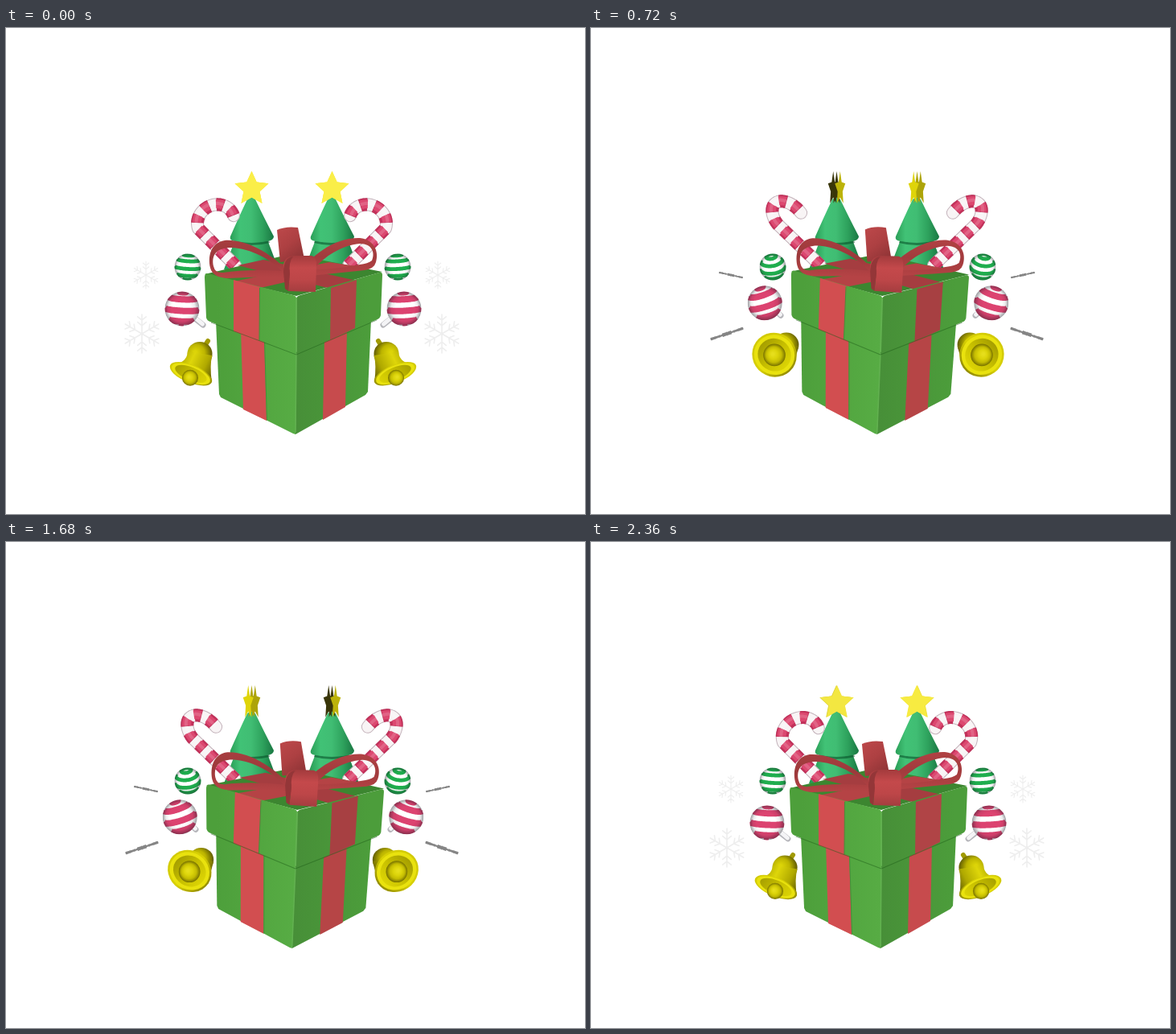
An HTML page with a canvas that plays this animation: 720 by 604 pixels, repeating every 2400 ms.

```html
<!DOCTYPE html>
<html lang="en">
<head>
<meta charset="utf-8">
<title>Gift box</title>
<style>
html, body { margin: 0; width: 100%; height: 100%; overflow: hidden; background: #fff; }
canvas { display: block; width: 720px; height: 604px; }
</style>
</head>
<body>
<canvas id="stage" width="720" height="604"></canvas>
<script>
const ctx = document.getElementById('stage').getContext('2d');
const LOOP = 2400, STEP = 40, TAU = Math.PI * 2, RAD = Math.PI / 180;
const { sin, cos, abs, hypot } = Math;
const mix = (a, b, k) => a + (b - a) * k;
const bump = (s, at, width) => Math.exp(-(((s - at) / width) ** 2));
const rgb = (...c) => `rgb(${c.map(Math.round)})`;

function poly(fill, ...pts) {
  ctx.beginPath();
  for (let i = 0; i < pts.length; i += 2) ctx.lineTo(pts[i], pts[i + 1]);
  ctx.closePath();
  ctx.fillStyle = fill;
  ctx.fill();
}

function shape(d, fill) {
  ctx.fillStyle = fill;
  ctx.fill(new Path2D(d), 'evenodd');
}

function ellipse(x, y, rx, ry, rot, fill) {
  ctx.beginPath();
  ctx.ellipse(x, y, rx, ry, rot, 0, TAU);
  ctx.fillStyle = fill;
  ctx.fill();
}

function stops(gradient, colors) {
  colors.forEach((c, i) => gradient.addColorStop(i / (colors.length - 1), c));
  return gradient;
}

const linear = (x0, y0, x1, y1, ...colors) => stops(ctx.createLinearGradient(x0, y0, x1, y1), colors);
const radial = (x, y, r, ...colors) =>
  stops(ctx.createRadialGradient(x - r * .15, y - r * .1, r * .1, x, y, r), colors);

function line(color, width, ...pts) {
  ctx.beginPath();
  for (let i = 0; i < pts.length; i += 2) ctx.lineTo(pts[i], pts[i + 1]);
  ctx.strokeStyle = color;
  ctx.lineWidth = width;
  ctx.stroke();
}

// Draws on the left, then mirrored on the right
function both(draw, shift = 0) {
  draw(false);
  ctx.save();
  ctx.translate(711 + shift, 0);
  ctx.scale(-1, 1);
  draw(true);
  ctx.restore();
}

// Sphere with latitude bands around a pole
function stripedBall(x, y, r, color, pole, gap, width) {
  const len = hypot(...pole), [px, py, pz] = pole.map(v => v / len);
  const h = hypot(px, py), ux = -py / h, uy = px / h;
  const wx = -pz * uy, wy = pz * ux, wz = px * uy - py * ux;
  ctx.save();
  ctx.beginPath();
  ctx.arc(x, y, r, 0, TAU);
  ctx.fillStyle = '#fff';
  ctx.fill();
  ctx.clip();
  ctx.strokeStyle = color;
  ctx.lineWidth = width;
  ctx.lineCap = 'butt';
  for (let lat = -2 * gap; lat <= 2 * gap; lat += gap) {
    const a = sin(lat * RAD), b = cos(lat * RAD);
    let pen = false;
    ctx.beginPath();
    for (let i = 0; i <= 120; i++) {
      const c = b * cos(i * TAU / 80), d = b * sin(i * TAU / 80);
      if (a * pz + d * wz < -.04) { pen = false; continue; }
      const qx = x + r * (a * px + c * ux + d * wx), qy = y + r * (a * py + c * uy + d * wy);
      pen ? ctx.lineTo(qx, qy) : ctx.moveTo(qx, qy);
      pen = true;
    }
    ctx.stroke();
  }
  ctx.fillStyle = radial(x, y, r, 'rgba(0,0,0,0)', 'rgba(0,0,0,0)', 'rgba(0,0,0,0)', 'rgba(20,20,30,.08)', 'rgba(20,20,30,.42)');
  ctx.fillRect(x - r, y - r, 2 * r, 2 * r);
  ctx.restore();
}

// Snowflake that turns sideways, then tips over
function flake(x, y, r, s, tilt, dark) {
  const yaw = bump(s, .32, .13), pitch = bump(s, .6, .11);
  const tone = 238 - (238 - dark) * yaw ** 4 - 105 * pitch;
  ctx.save();
  ctx.translate(x, y);
  ctx.rotate((17 * yaw + tilt * pitch) * RAD);
  ctx.scale(1 - .76 * yaw, 1 - .93 * pitch);
  ctx.beginPath();
  for (let i = 0; i < 6; i++) {
    ctx.moveTo(0, 0);
    ctx.lineTo(0, -r);
    for (const at of [.42, .7])
      for (const side of [-1, 1]) {
        ctx.moveTo(0, -r * at);
        ctx.lineTo(side * r * .22, -r * (at + .18));
      }
    ctx.rotate(TAU / 6);
  }
  ctx.restore();
  ctx.lineCap = 'round';
  ctx.lineWidth = r / 15;
  ctx.strokeStyle = rgb(tone, tone, tone);
  ctx.stroke();
}

function tree(x) {
  const bark = linear(x - 28, 0, x + 28, 0, '#289a54', '#41c276', '#40bd73', '#2ea25d', '#1a7843');
  shape(`M${x - 20} 263 L${x - 34} 300 H${x + 34} L${x + 20} 263Z`, bark);
  shape(`M${x - 21} 264 Q${x} 270 ${x + 22} 264 L${x + 23} 267 Q${x} 273 ${x - 22} 267Z`, 'rgba(5,75,38,.55)');
  shape(`M${x - 5} 213 Q${x} 208 ${x + 5} 213 Q${x + 15} 234 ${x + 28} 259
    Q${x + 28} 264 ${x + 20} 265 Q${x} 268 ${x - 20} 265 Q${x - 28} 264 ${x - 26} 259 Q${x - 15} 234 ${x - 5} 213Z`, bark);
}

function star(x, turn, right) {
  const edge = abs(sin(turn)), lit = (sin(2 * turn) >= 0) !== right;
  const face = mix(250, lit ? 222 : 185, edge), side = mix(face, lit ? 170 : 50, edge);
  for (let layer = 1; layer >= -1; layer--) {
    const tone = layer < 0 ? face : side;
    ctx.beginPath();
    for (let i = 0; i < 10; i++) {
      const r = i % 2 ? 10.5 : 22, a = i * TAU / 10;
      ctx.lineTo(x + layer * (lit ? 4.5 : -4.5) * edge + r * sin(a) * cos(turn), 200 - r * cos(a));
    }
    ctx.closePath();
    ctx.fillStyle = rgb(tone, tone * .95, mix(72, 6, edge));
    ctx.fill();
  }
}

// Straight stem and a half-circle hook that turns about the stem
function cane(s) {
  const r = 22, x = 235 + 4 * cos(TAU * s), y = 246 + 3 * cos(TAU * s);
  const nx = r * cos(1.4 * s), ny = r * (.4 * s ** 4 - .36 - .25 * sin(5.2 * s));
  const ux = -r * (.3 + .45 * sin(1.75 * s)), uy = -r * .92;
  const path = new Path2D();
  path.moveTo(285, 295);
  for (let i = 0; i <= 24; i++) {
    const a = i / 24 * Math.PI;
    path.lineTo(x + nx * (1 - cos(a)) + ux * sin(a), y + ny * (1 - cos(a)) + uy * sin(a));
  }
  const pass = (color, width, cap, dash, shift = 0) => {
    ctx.save();
    ctx.translate(shift, shift);
    ctx.lineJoin = 'round';
    ctx.strokeStyle = color;
    ctx.lineWidth = width;
    ctx.lineCap = cap;
    ctx.setLineDash(dash);
    ctx.stroke(path);
    ctx.restore();
  };
  pass('#c3b2ba', 16, 'round', []);
  pass('#f8f4f5', 14, 'round', []);
  pass('#c2315a', 16, 'butt', [9, 9]);
  pass('#dc4870', 11, 'butt', [9, 9], -.7);
  pass('rgba(255,255,255,.15)', 4, 'round', [], -1.5);
}

function lolly(k) {
  const x = mix(219, 216, k), y = mix(349, 341, k);
  const sx = mix(245, 235, k), sy = mix(368, 355, k);
  ctx.lineCap = 'round';
  line('#b5b5ba', 7, x + 16, y + 12, sx, sy + 1);
  line('#f4f4f6', 5, x + 16, y + 11, sx - .5, sy);
  stripedBall(x, y, 21.5, '#dc4370', [mix(.05, -.36, k), -1, mix(.12, .25, k)], 40, 8);
}

function bell(k) {
  const mx = mix(230, 228, k), my = mix(430, 405, k), tilt = mix(22, 36, k) * RAD;
  const major = 28, minor = mix(11, 28, k), dx = mix(241, 243, k), dy = mix(405, 393, k);
  const cx = cos(tilt) * major, cy = sin(tilt) * major;
  ctx.lineCap = 'round';
  line('#a19a00', 6, mix(251, 252, k), 389, dx, dy);
  ellipse(dx, dy, 15.5, 15, 0, radial(dx - 3, dy, 19, '#dcd408', '#bdb500', '#5b5600'));
  ctx.beginPath();
  ctx.moveTo(dx - 15, dy - 3);
  ctx.quadraticCurveTo(dx - 16, mix(dy + 12, my, k), mx - cx, my - cy);
  ctx.lineTo(mx + cx, my + cy);
  ctx.quadraticCurveTo(dx + 12, dy + 14, dx + 15.5, dy + 2);
  ctx.fillStyle = linear(mx - 22, my - 12, mx + 28, my + 12, '#a39c00', '#ded60a', '#b0a900', '#4b4600');
  ctx.fill();
  ellipse(mx, my, major, minor, tilt, linear(mx - 20, my - 20, mx + 22, my + 22, '#d2ca06', '#d8d004', '#8c8500'));
  ellipse(mx, my, major - 2.5, minor * .9, tilt, '#e9e20e');
  ellipse(mx, my, major - 7, minor * .74, tilt, linear(mx - 16, my - 14, mx + 18, my + 16, '#a59e00', '#c8c000', '#dfd706'));
  const bx = mix(229, 228, k), by = mix(435, 405, k), r = mix(10, 14, k);
  ellipse(bx, by, r, r, 0, radial(bx, by, r, '#e6de1c', '#dcd40a', '#c4bc02', '#777100'));
}

function box(angle) {
  const dim = angle / 5;
  const leaf = linear(262, 0, 361, 0, '#4d9f3b', '#57ac44');
  const shade = linear(361, 0, 452, 0, '#478f38', '#4c9d3b');
  const red = '#d24e50';
  const sideRed = rgb(mix(199, 152, dim), mix(75, 58, dim), mix(77, 59, dim));
  const lidRed = rgb(mix(176, 150, dim), mix(68, 58, dim), mix(70, 59, dim));
  ctx.save();
  ctx.translate(358, 370);
  ctx.rotate(angle * RAD);
  ctx.translate(-358, -370);
  ctx.lineJoin = ctx.lineCap = 'round';

  // Body
  poly(leaf, 261, 364, 361, 396, 360, 505, 357, 504, 267, 459, 265, 455);
  poly(shade, 361, 396, 454, 362, 450, 452, 447, 456, 360, 505);
  poly(red, 292, 374, 321, 384, 324, 488, 295, 474);
  poly(sideRed, 396, 384, 424, 374, 422, 471, 394, 487);
  line('#44903a', 1, 321.5, 388, 324.5, 487);
  line('#62b150', 1.5, 361, 405, 360, 502);

  // Lid
  poly('#3c8630', 247, 306, 354, 281, 468, 303, 361, 333);
  poly('#b54345', 283, 315, 316, 323, 435, 296, 402, 291);
  poly('#a53d40', 404, 324, 436, 314, 320, 288, 288, 295);
  shape('M250 305 Q247 305 247 310 L249 360 Q250 364 254 365 L357 404 Q361 406 361 402 L361 336 Q361 333 357 332Z', leaf);
  shape('M361 336 Q362 333 366 332 L464 304 Q468 303 468 307 L466 357 Q465 361 462 362 L365 404 Q361 406 361 402Z', shade);
  poly(red, 283, 313, 316, 322, 315, 389, 283, 377);
  poly(lidRed, 404, 323, 436, 313, 434, 373, 403, 388);
  line('#44903a', 1, 315.5, 323, 315, 388);
  line('#62b150', 2, 361, 336, 361, 402);
  line('rgba(30,95,25,.5)', 1, 255, 366, 361, 406, 461, 363);

  // Bow: rear loop, side loops, front loop
  shape('M337 251 Q348 246 363 248 L371 287 L341 291Z', linear(337, 248, 368, 288, '#bd484a', '#ad4042', '#8c3335'));
  shape(`M353 306 C335 283 300 262 272 264 C254 267 251 284 254 298 Q257 310 275 311 Q315 309 353 309Z
    M258 296 C255 282 262 273 280 273 C305 274 330 288 343 302 Q300 299 270 304 Q260 305 258 296Z`,
    linear(0, 262, 0, 310, '#a83e40', '#9c393b', '#b54345'));
  shape(`M364 306 C378 284 408 260 440 261 C458 263 464 278 460 291 Q458 299 446 301 Q400 306 364 309Z
    M383 300 C395 284 418 270 440 268 C456 268 459 280 455 289 Q450 293 440 294 Q410 300 383 300Z`,
    linear(0, 260, 0, 308, '#b14244', '#a23b3d', '#b54345'));
  shape('M345 294 Q347 283 359 283 L380 283 Q386 284 386 294 L385 328 L351 327 L353 302 Q351 294 345 303Z',
    linear(0, 283, 0, 328, '#a33b3d', '#c4494b', '#bd4648', '#a43d3f'));
  shape('M345 303 Q345 286 357 284 Q351 291 353 306 L351 327 L347 324Z', '#943638');
  ctx.restore();
}

function render(time) {
  const p = Math.floor(time % LOOP / STEP) * STEP / LOOP;
  const s = 2 * Math.min(p, 1 - p);
  const beat = 2 * p * TAU;
  const swing = (1 - cos(beat)) / 2;
  const sway = (1 - cos(beat - .03 * TAU)) / 2;
  const roll = sin(Math.PI * s ** .8) ** 8;
  const lean = 1.62 - .62 * cos(beat) - 2.31 * cos(2 * beat) + 1.31 * cos(3 * beat);

  ctx.fillStyle = '#fff';
  ctx.fillRect(0, 0, 720, 604);
  both(right => {
    const dark = right ? 125 : 30;
    flake(174, 307, 17, s, 12, dark);
    flake(169, 380, 24, s, -19, dark);
  });
  for (const right of [false, true]) {
    const x = right ? 405 : 305;
    tree(x);
    star(x + .5, p * TAU, right);
  }
  both(() => cane(s));
  both(() => stripedBall(226, 297, 16.5, '#1fae4e',
    [mix(.06, -.45, roll), mix(-1, -.04, roll), mix(.15, .9, roll)], 34, 4.8), 2);
  both(() => lolly(swing), 3);
  both(() => bell(sway), 3);
  box(lean);
}

function loop(now) {
  render(now);
  requestAnimationFrame(loop);
}
render(0);
requestAnimationFrame(loop);
</script>
</body>
</html>
```
